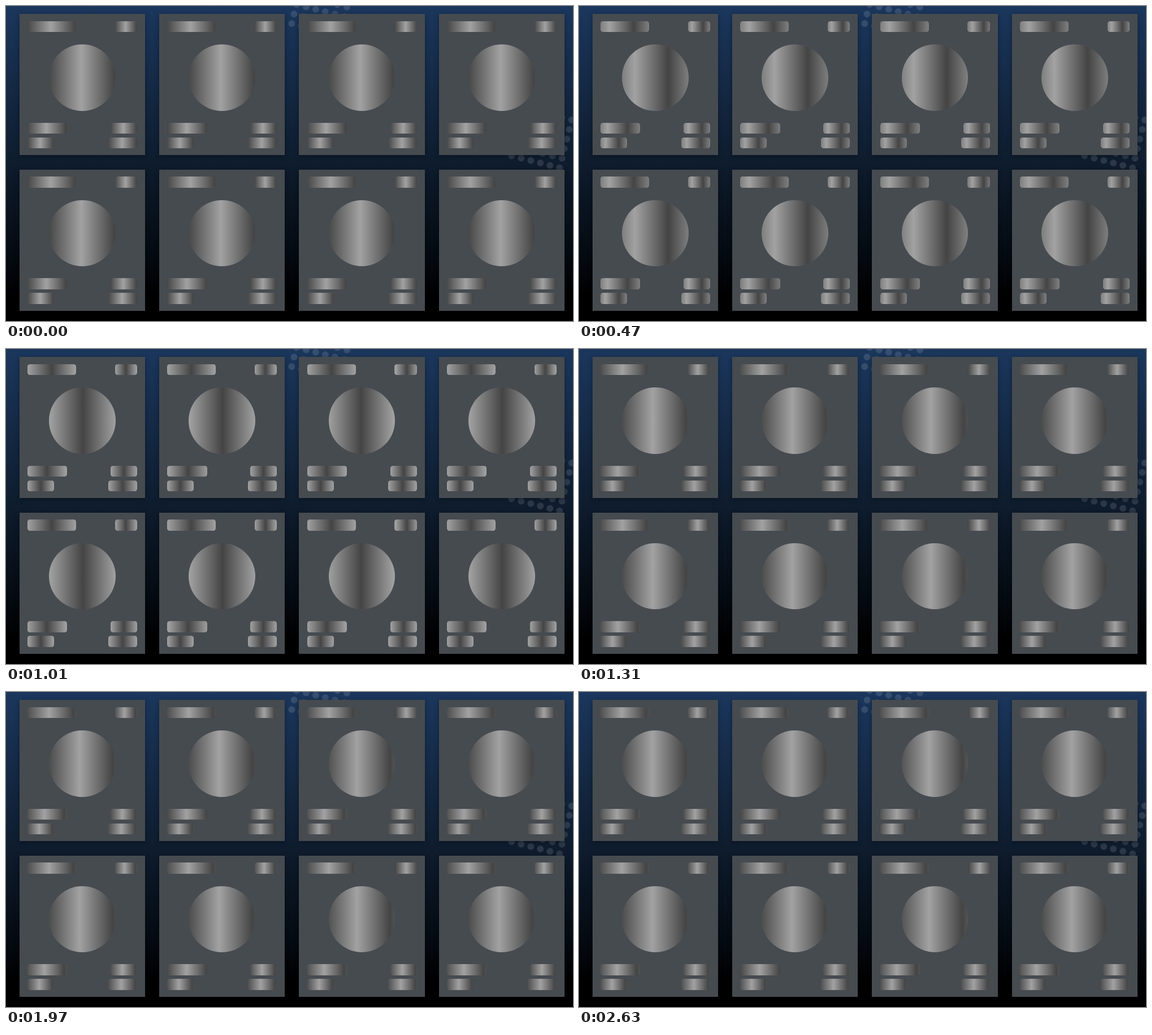
Write an HTML page that moves like this. It is 1003 px wide and 558 px high and loops after 2.69 s.

```html
<!DOCTYPE html>
<html lang="en">
<head>
<meta charset="utf-8">
<title>Loading cards</title>
<style>
  html, body {
    margin: 0;
    width: 100%;
    height: 100%;
    overflow: hidden;
  }
  .stage {
    position: relative;
    width: 1003px;
    height: 558px;
    overflow: hidden;
    background: linear-gradient(#1b375d, #0e1c2d 50%, #03070c 84%, #000 92%);
  }
  .dots {
    position: absolute;
    width: 105px;
    height: 105px;
    margin: -52.5px 0 0 -52.5px;
    transform: rotate(14.2deg);
    background: radial-gradient(circle, rgba(255, 255, 255, .12) 5.5px, transparent 6.2px) 0 0 / 17.5px 17.5px;
  }
  .card {
    position: absolute;
    width: 222.4px;
    height: 250.4px;
    background: #464b50;
    box-shadow: 0 2px 8px rgba(0, 0, 0, .35);
  }
  .bone {
    position: absolute;
    height: 19.5px;
    border-radius: 4.5px;
    /* two waves per tile, so one wave spans the element */
    background: linear-gradient(90deg, #444, #a2a2a2 25%, #444 50%, #a2a2a2 75%, #444) 0 0 / 200% 100%;
    animation: shimmer 2690ms -2ms infinite;
  }
  .disc {
    left: 52.4px;
    top: 54px;
    width: 117.6px;
    height: 117.6px;
    border-radius: 50%;
  }
  .title { left: 14.3px;  top: 12.7px;  width: 86px; }
  .tag   { right: 14.2px; top: 12.7px;  width: 39.2px; }
  .name  { left: 14.3px;  top: 192.7px; width: 70.3px; }
  .price { right: 14.2px; top: 192.7px; width: 47px; }
  .note  { left: 14.3px;  top: 218.5px; width: 47px; }
  .stock { right: 14.2px; top: 218.5px; width: 51px; }

  @keyframes shimmer {
    0% {
      background-position-x: -98%;
      animation-timing-function: steps(8);
    }
    17.4721% {
      background-position-x: -168.7%;
      animation-timing-function: steps(37);
    }
    100% {
      background-position-x: -502.8%;
    }
  }
</style>
</head>
<body>
<div class="stage" id="stage">
  <div class="dots" style="left:558.2px;top:-.8px"></div>
  <div class="dots" style="left:947.2px;top:233.2px"></div>
</div>
<script>
  const stage = document.getElementById('stage');
  const parts = ['title', 'tag', 'disc', 'name', 'price', 'note', 'stock'];
  const bones = parts.map(p => `<div class="bone ${p}"></div>`).join('');

  for (let i = 0; i < 8; i++) {
    const card = document.createElement('div');
    card.className = 'card';
    card.style.left = 23.6 + (i % 4) * 247.4 + 'px';
    card.style.top = 14 + Math.floor(i / 4) * 275.6 + 'px';
    card.innerHTML = bones;
    stage.append(card);
  }
</script>
</body>
</html>
```
